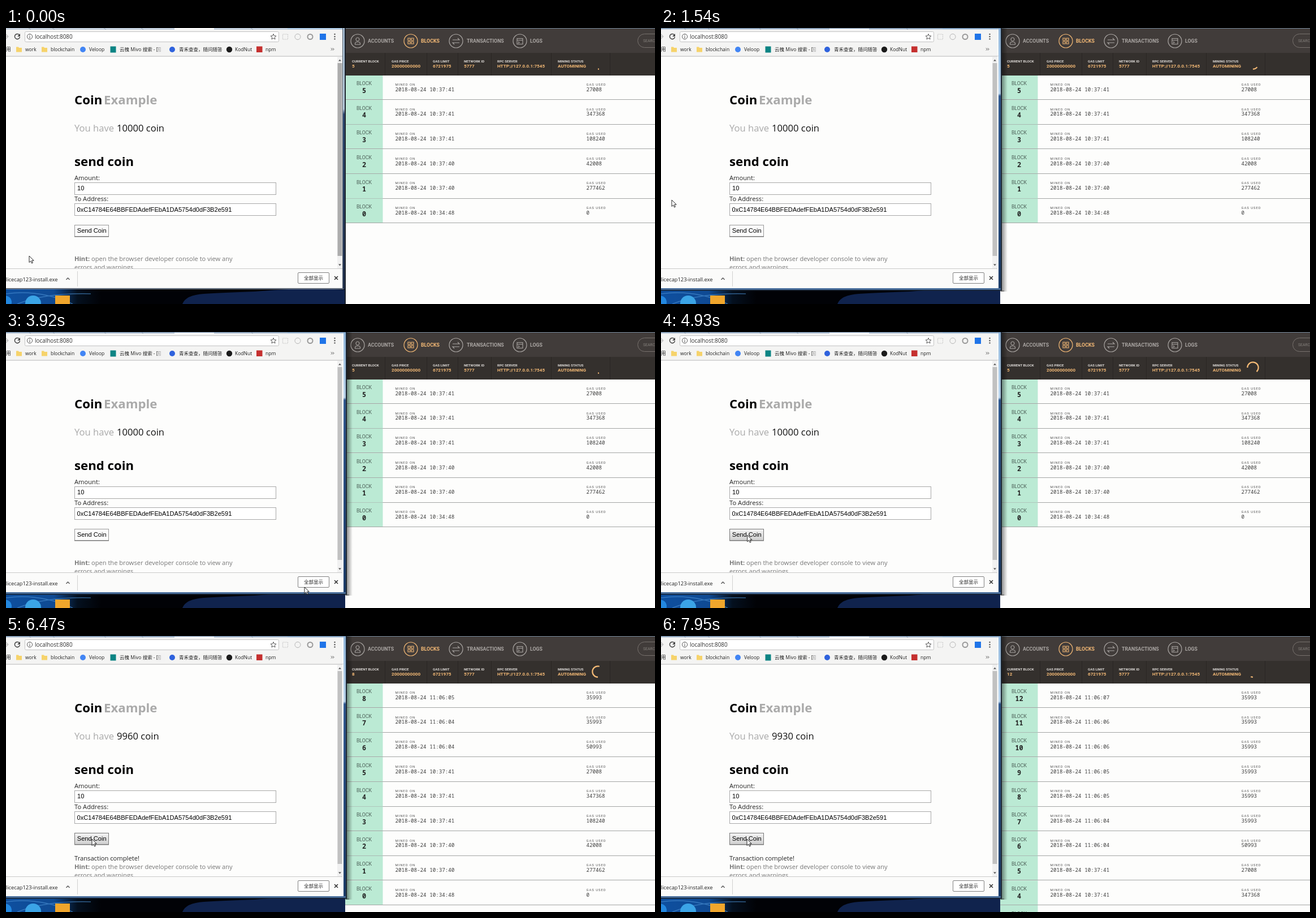
Recreate the animation shown at these times as an HTML page. Size 1148 by 488 pixels, loop 8 s.

```html
<!DOCTYPE html>
<html lang="en">
<head>
<meta charset="utf-8">
<title>Coin demo</title>
<style>
  html, body { margin: 0; width: 1148px; height: 488px; overflow: hidden; background: #fdfdfc; }
  svg { display: block; }
  text { white-space: pre; }
  .page { font-family: "Open Sans", sans-serif; }
  .ui { font-family: "Open Sans", "Noto Sans CJK SC", "Noto Sans CJK", sans-serif; }
  .field { font-family: "Liberation Sans", Arial, sans-serif; }
  .cond { font-family: Roboto, sans-serif; }
  .mono { font-family: "Noto Sans Mono", monospace; }
  .b { font-weight: 700; }
  .wide { letter-spacing: .9px; }
  .mid { text-anchor: middle; }
</style>
</head>
<body>
<svg id="stage" width="1148" height="488" viewBox="0 0 1148 488"></svg>
<script>
const LOOP = 8000, ROW = 43.6, TOP = 83.5;
const GOLD = '#f5ba76', GREY = '#aaa6a3';

const text = (x, y, size, str, fill = '#222', cls = 'page', extra = '') =>
  `<text x="${x}" y="${y}" font-size="${size}" fill="${fill}" class="${cls}" ${extra}>${str}</text>`;
const rect = (x, y, w, h, fill, extra = '') =>
  `<rect x="${x}" y="${y}" width="${w}" height="${h}" fill="${fill}" ${extra}/>`;
const disc = (x, y, r, fill, extra = '') =>
  `<circle cx="${x}" cy="${y}" r="${r}" fill="${fill}" ${extra}/>`;
const line = (d, stroke, width = 1, extra = '') =>
  `<path d="${d}" fill="none" stroke="${stroke}" stroke-width="${width}" ${extra}/>`;
const shape = (d, fill) => `<path d="${d}" fill="${fill}"/>`;

const defs = `<defs>
  <linearGradient id="sky"><stop offset="0" stop-color="#0e4f9f"/><stop offset=".14" stop-color="#0f4a93"/>
    <stop offset=".21" stop-color="#04101f"/><stop offset=".28" stop-color="#010206"/><stop offset="1" stop-color="#010206"/></linearGradient>
  <linearGradient id="shade"><stop offset="0" stop-opacity=".5"/><stop offset="1" stop-opacity="0"/></linearGradient>
  <linearGradient id="press" x2="0" y2="1"><stop offset="0" stop-color="#f4f4f4"/><stop offset="1" stop-color="#cfcfcf"/></linearGradient>
  <linearGradient id="edge" x2="0" y2="1"><stop offset="0" stop-color="#a5bbd0"/><stop offset=".31" stop-color="#bccfdf"/>
    <stop offset=".33" stop-color="#2f4b75"/><stop offset="1" stop-color="#22314e"/></linearGradient>
  <linearGradient id="edgeOn" x2="0" y2="1"><stop offset="0" stop-color="#8fb4d8"/><stop offset=".25" stop-color="#b9d3ea"/>
    <stop offset=".26" stop-color="#31598f"/><stop offset="1" stop-color="#1c3c68"/></linearGradient>
  <clipPath id="view"><path d="M0 51H586V425H0z"/></clipPath>
</defs>`;

function desktop() {
  return rect(0, 458, 601, 30, 'url(#sky)') +
    line('M0 470Q60 462 118 488M20 488Q70 468 150 470', '#4d93d6', 1.5, 'opacity=".6"') +
    shape('M312 488Q318 472 350 470T440 466Q520 458 601 463V488z', '#10234d') +
    disc(-2, 485, 12, '#2388e0') + disc(48, 487, 14, '#3ba4e6') + rect(87, 473, 26, 15, '#f0a62c');
}

function ganache() {
  const nav = [[622, 'ACCOUNTS', 640], [716, 'BLOCKS', 734], [796, 'TRANSACTIONS', 815], [909, 'LOGS', 927]];
  const icons = [
    'M617.500 29V27Q618 24.500 622 24.500T626.500 27V29zM622 17A3 3 0 1 1 621.900 17z',
    'M711 18h4v4h-4zM717 18h4v4h-4zM711 24h4v4h-4zM717 24h4v4h-4z',
    'M790 21H802L799 18M802 26H790L793 29',
    'M904 18.500H914V28.500H904zM904 21.500H914M906 24L908 25.500L906 27'];
  const stats = [[612, 'CURRENT BLOCK', '5'], [682, 'GAS PRICE', '20000000000'], [755, 'GAS LIMIT', '6721975'],
    [810, 'NETWORK ID', '5777'], [869, 'RPC SERVER', 'HTTP://127.0.0.1:7545'], [976, 'MINING STATUS', 'AUTOMINING']];
  let out = rect(600, 0, 548, 488, '#fdfdfc') + '<g id="rows"></g>' +
    rect(600, 0, 548, 44, '#413c3a') + rect(600, 44, 548, 40, '#34302d') + rect(600, 0, 548, 1, '#6f8294');
  nav.forEach(([cx, label, x], i) => {
    const c = i === 1 ? GOLD : GREY;
    out += disc(cx, 23, 12, 'none', `stroke="${c}" stroke-width="1.2"`) + line(icons[i], c, 1.1) +
      text(x, 26.3, 8.8, label, c, 'cond b');
  });
  out += rect(1117.5, 10.5, 60, 24, 'none', `rx="12" stroke="#77716d"`) + text(1127, 25.3, 6.8, 'SEARCH', '#85807c', 'cond');
  stats.forEach(([x, label, value], i) => {
    out += text(x, 61, 6.1, label, '#dedbd8', 'cond b') +
      text(x, 70.2, 8.1, value, GOLD, 'cond b', i ? '' : 'id="current"');
  });
  for (const x of [670, 744, 799, 858, 964, 1068]) out += rect(x, 44, 1, 40, '#2a2624');
  return out + disc(1047, 63, 9.7, 'none',
    `id="spin" stroke="${GOLD}" stroke-width="2.2" pathLength="360" transform="rotate(90 1047 63)"`);
}

function chrome() {
  const marks = [[34, 'work'], [79, 'blockchain'], [147, 'Veloop'], [201, '云槐 Mivo 搜索 - 国'],
    [306, '青禾查查，随问随答'], [405, 'KodNut'], [459, 'npm']];
  const folder = x => shape(`M${x} 33.500h4l1 1.500h5v7.500h-10z`, '#f6d36b');
  return rect(0, 0, 597, 460, '#fdfdfc') + rect(0, 0, 597, 3, '#c2cedc') +
    line('M40 0L44 3M82 0L86 3M173 0L177 3M239 0L243 3M433 0L437 3', '#8f9dad') +
    rect(298, 0, 70, 3, '#fafafa') + rect(498, 0, 97, 2, '#a9c6e0') + rect(0, 3, 595, 47, '#f4f4f3') +
    line('M0 11L4 15L0 19M-4 15H4', '#c4c4c4', 1.3) +
    line('M23.500 12A4.600 4.600 0 1 0 24.500 16', '#444', 1.5) + shape('M25 10v5h-5z', '#444') +
    rect(33.5, 6.5, 449, 18, '#fff', 'rx="2" stroke="#c2c2c2"') +
    disc(42, 15.2, 4.6, 'none', 'stroke="#555"') + line('M42 14.500V18M42 12V13.300', '#555', 1.1) +
    text(51, 18.8, 9.9, 'localhost:8080', '#333', 'ui') +
    line('M473 10.500l1.400 3.300 3.600.3-2.700 2.300.8 3.500-3.100-1.900-3.100 1.900.8-3.500-2.700-2.300 3.600-.3z', '#555') +
    rect(489.5, 11, 9, 9, 'none', 'stroke="#c8c8c8" stroke-dasharray="2 1"') +
    disc(516, 15.5, 5, 'none', 'stroke="#b5b5b5"') + disc(538, 15.5, 4.5, 'none', 'stroke="#999" stroke-width="2"') +
    rect(555, 10, 11, 11, '#1f74e8') + [11, 15.2, 19.4].map(y => disc(581.5, y, 1.2, '#555')).join('') +
    text(0, 41, 8.6, '用', '#222', 'ui') + folder(18) + folder(63) +
    disc(136, 38, 5, '#4285f4') + rect(184.5, 32.5, 10, 11, '#0c8484') + disc(294, 38, 5, '#2f62dd') +
    disc(395, 38, 5.2, '#1b1b1b') + rect(443, 32.5, 10.5, 10.5, '#c5302f') +
    marks.map(([x, s]) => text(x, 41, 8.5, s, '#222', 'ui')).join('') +
    rect(268, 30, 14, 16, '#f4f4f3', 'opacity=".6"') + line('M575 35.500l2 2-2 2M578 35.500l2 2-2 2', '#444') +
    rect(0, 49.5, 597, 1, '#b8b8b8');
}

function page() {
  return '<g clip-path="url(#view)">' + text(121, 135, 22.2, 'Coin', '#000', 'page b') +
    text(173, 135, 22.2, 'Example', '#aaa', 'page b') +
    text(121, 183.3, 16.6, 'You have', '#aaa') + text(196, 183.3, 16.6, '10000 coin', '#111', 'page', 'id="balance"') +
    text(121, 244, 22.2, 'send coin', '#000', 'page b') +
    text(121, 269, 11.2, 'Amount:') + text(121, 306.3, 11.2, 'To Address:') +
    rect(121.5, 273.5, 356, 21, '#fff', 'stroke="#a8a8a8"') + rect(121.5, 310.5, 356, 21, '#fff', 'stroke="#a8a8a8"') +
    text(126, 287.2, 11.1, '10', '#000', 'field') +
    text(125.5, 325, 11.1, '0xC14784E64BBFEDAdefFEbA1DA5754d0dF3B2e591', '#000', 'field') +
    rect(121.5, 348.5, 60, 20, '#fbfbfb', 'id="send" stroke="#9a9a9a"') + rect(121, 368, 61, 1.5, '#777') +
    text(125.8, 362.3, 11.1, 'Send Coin', '#000', 'field') +
    text(121, 397, 11.2, 'Transaction complete!', '#222', 'page', 'id="done"') +
    text(121, 412, 11.1, '<tspan class="b">Hint:</tspan> open the browser developer console to view any', '#777') +
    text(121, 427, 11.1, 'errors and warnings', '#777') + '</g>' +
    rect(586, 51, 9, 374, '#f1f1f1') + rect(586.5, 62, 8, 341, '#bcbcbc', 'id="thumb"') +
    shape('M588 58.500l2.500-3 2.500 3zM588 417.500l2.500 3 2.500-3z', '#555');
}

function shelf() {
  return rect(0, 425, 597, 35, '#fbfbfa') + rect(0, 425, 597, 1, '#c9c9c9') +
    text(91.5, 447.5, 9.3, 'licecap123-install.exe', '#222', 'ui', 'text-anchor="end"') +
    line('M106.500 445l3-3 3 3', '#555', 1.4) + rect(126, 430, 1, 27, '#d0d0d0') +
    rect(516.5, 432.5, 55, 19, '#fff', 'rx="1.5" stroke="#808080"') + text(527, 445.3, 8.5, '全部显示', '#222', 'ui') +
    line('M581 439l6 6M587 439l-6 6', '#333', 1.6);
}

const idleFrame = rect(595, 0, 1, 462, '#5b6672') + rect(596, 0, 3, 462, 'url(#edge)') +
  rect(599, 0, 2, 488, '#1b222c') + rect(0, 460, 597, 1, '#3b4658') + rect(0, 461, 597, 1, '#8d97a5');
const liveFrame = rect(601, 0, 12, 466, 'url(#shade)') + rect(595, 50, 2, 410, '#fdfdfc') +
  rect(597, 0, 4, 463, 'url(#edgeOn)') + rect(601, 0, 2, 464, '#1d2733') + rect(600, 464, 7, 2, '#000', 'opacity=".25"') +
  rect(0, 460, 601, 3, '#4a6f9c') + rect(0, 463, 603, 1.5, '#15202e') + rect(0, 0, 601, 1, '#5c7a9b');

const stage = document.getElementById('stage');
stage.innerHTML = defs + desktop() + ganache() + chrome() + page() + shelf() +
  `<g id="idle">${idleFrame}</g><g id="live">${liveFrame}</g>` +
  '<path id="cursor" d="M0 0V11.500L2.700 9L4.600 13L6.400 12.200L4.600 8.200H8.200z" fill="#fff" stroke="#111" stroke-width=".9"/>';
const el = id => document.getElementById(id);

const bursts = [[0, 0, 1], [150, 1150, 8], [1290, 2210, 8], [2360, 3370, 9], [3490, 4420, 8],
  [4570, 5480, 8], [5630, 6590, 8], [6710, 7650, 8], [7810, 7950, 2]];
const ticks = bursts.flatMap(([a, b, n]) =>
  Array.from({ length: n }, (_, i) => a + (b - a) * i / Math.max(1, n - 1)));

const path = [[0, 41, 403], [150, 41, 403], [1100, 19, 304], [1560, 19, 304], [2210, 170, 400], [2600, 312, 472],
  [2900, 312, 472], [3350, 460, 448], [3800, 528, 451], [4030, 528, 451], [4420, 279, 400], [4850, 152, 359], [LOOP, 152, 359]];
const mined = [5480, 5870, 6220, 6580, 6950, 7380, 7800];
const paid = [5480, 5760, 6150, 6440, 6840, 7380, 7800];
const gas = [0, 277462, 42008, 108240, 347368, 27008, 50993];
const clock = ['10:34:48', '10:37:40', '10:37:40', '10:37:41', '10:37:41', '10:37:41'];

const passed = (times, t) => times.filter(x => x <= t + 1).length;
const show = (id, on) => el(id).setAttribute('display', on ? 'inline' : 'none');
const ease = x => (1 - Math.cos(Math.PI * Math.min(1, x))) / 2;

function blockRow(n, i) {
  const y = TOP + i * ROW;
  const time = clock[n] || '11:06:0' + (4 + Math.floor((n - 6) / 2));
  return rect(600, y, 66.5, ROW, '#bbead4') + text(633.5, y + 17.6, 8.8, 'BLOCK', '#4d6058', 'cond mid') +
    text(633.5, y + 31.2, 11.8, n, '#222', 'mono b mid') +
    text(688.5, y + 18.5, 6, 'MINED ON', '#555', 'cond wide') +
    text(688.5, y + 28.3, 9.2, '2018-08-24 ' + time, '#3c3c3c', 'mono') +
    text(1026.5, y + 18.5, 6, 'GAS USED', '#555', 'cond wide') +
    text(1026.5, y + 28.3, 9.2, gas[n] ?? 35993, '#3c3c3c', 'mono') +
    rect(600, Math.round(y + ROW - 1), 548, 1, '#a3a5a4');
}

let shownBlock = -1;
function drawBlocks(last) {
  if (last === shownBlock) return;
  shownBlock = last;
  el('current').textContent = last;
  el('rows').innerHTML = Array.from({ length: Math.min(10, last + 1) }, (_, i) => blockRow(last - i, i)).join('');
}

function drawSpinner(t) {
  const p = (t - 40 + 1940) % 1940;
  const head = 360 * ease(p / 1200) ** 0.85;
  const tail = Math.min(348, 360 * (1 - (1 - Math.max(0, p - 740) / 1200) ** 1.9));
  el('spin').setAttribute('stroke-dasharray', `${Math.max(12, head - tail)} 400`);
  el('spin').setAttribute('stroke-dashoffset', -tail);
}

function drawCursor(t) {
  const i = path.findIndex(k => k[0] > t);
  const [t0, x0, y0] = path[i - 1], [t1, x1, y1] = path[i];
  const k = ease((t - t0) / (t1 - t0));
  el('cursor').setAttribute('transform', `translate(${x0 + (x1 - x0) * k} ${y0 + (y1 - y0) * k})`);
}

function draw(now) {
  const t = ticks[passed(ticks, now % LOOP + 15) - 1];
  const live = (t > 700 && t < 2480) || t > 3100;
  show('live', live);
  show('idle', !live);
  el('thumb').setAttribute('fill', live ? '#c1c1c1' : '#adadad');
  const hover = t > 4800;
  el('send').setAttribute('fill', hover ? 'url(#press)' : '#fbfbfb');
  el('send').setAttribute('stroke', hover ? '#777' : '#9a9a9a');
  const sent = passed(paid, t);
  el('balance').textContent = `${10000 - 10 * sent} coin`;
  show('done', sent > 0);
  drawBlocks(5 + passed(mined, t));
  drawSpinner(t);
  drawCursor(t);
}

function loop() {
  draw(performance.now());
  requestAnimationFrame(loop);
}
loop();
</script>
</body>
</html>
```
